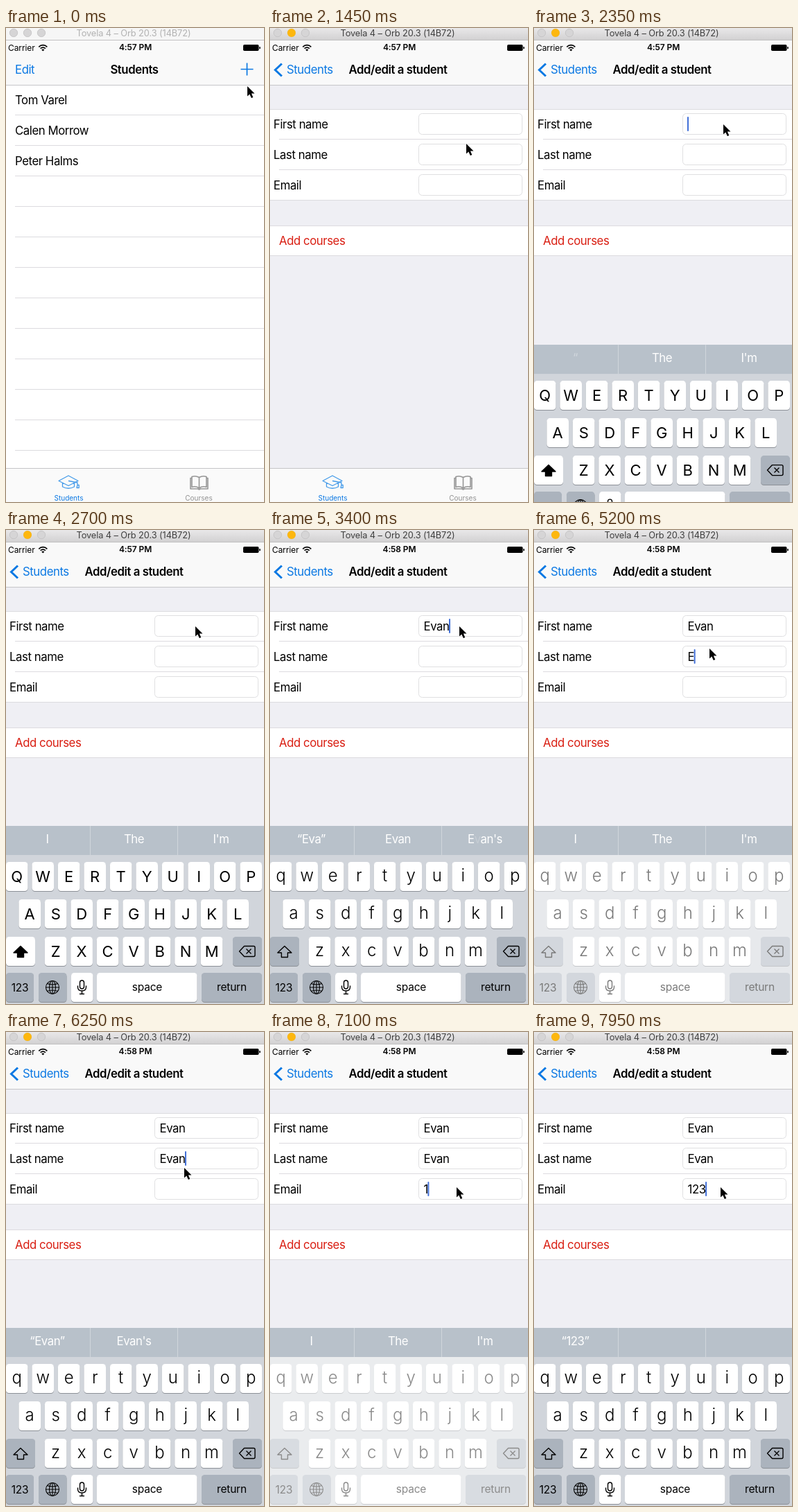
Animation of 372x684 px, one loop 8 s. Source, as an HTML page:

```html
<!DOCTYPE html>
<html lang="en">
<head>
<meta charset="utf-8">
<title>Add a student</title>
<style>
  html, body { margin: 0; width: 100%; height: 100%; overflow: hidden; background: #fff; }
  svg { display: block; width: 372px; height: 684px; }
  text { font: 400 16.8px Inter, Roboto, sans-serif; letter-spacing: -.45px; }
  .mid { text-anchor: middle; }
  .bold { font-weight: 600; }
  .blue { fill: #0b78e3; }
  .small { font-size: 12px; letter-spacing: -.1px; }
  .tab { font-size: 10px; letter-spacing: 0; }
  .word { fill: #fff; }
  .upper { font-size: 22px; letter-spacing: 0; }
  .lower { font-size: 24px; font-weight: 300; letter-spacing: 0; }
  .label { font-size: 15.5px; letter-spacing: -.2px; }
  .line { fill: none; stroke: #000; stroke-width: 1.4; stroke-linejoin: round; }
</style>
</head>
<body>
<svg id="stage" viewBox="0 0 372 684"></svg>
<script>
const LOOP = 8000;
const PUSH = 400, FOCUS_WINDOW = 350, KEYBOARD = 2185, MINUTE = 2900;

const fields = [
  { y: 123, focus: 2150, text: 'Evan', keys: [2750, 2950, 3150, 3350] },
  { y: 167, focus: 4400, text: 'Evan', keys: [5180, 5400, 5620, 5850] },
  { y: 211, focus: 6500, text: '123', keys: [7100, 7350, 7600] }
];

const suggestions = [
  [2200, '', 'The', "I'm"],
  [2300, '“', 'The', "I'm"],
  [2400, 'I', 'The', "I'm"],
  [3050, '“Ev”', 'Even', 'Every'],
  [3250, '“Eva”', 'Evan', 'E<tspan fill-opacity=".2">v</tspan>an\'s'],
  [3550, '“Evan”', "Evan's", ''],
  [4450, 'I', 'The', "I'm"],
  [5500, '“Ev”', 'Even', 'Every'],
  [5720, '“Eva”', 'Evan', "Evan's"],
  [5980, '“Evan”', "Evan's", ''],
  [6550, 'I', 'The', "I'm"],
  [7250, '“1”', '', ''],
  [7500, '“12”', '', ''],
  [7750, '“123”', '', '']
];

// [time, x, y] of the pointer tip
const pointerPath = [
  [0, 348, 84], [300, 347, 58], [850, 347, 58], [1450, 283, 167], [1650, 283, 167],
  [2000, 273, 139], [3750, 273, 139], [4250, 253, 171], [6000, 253, 171],
  [6250, 257, 196], [6450, 269, 224], [LOOP, 269, 224]
];

const text = (x, y, s, cls = '', attrs = '') => `<text x="${x}" y="${y}" class="${cls}" ${attrs}>${s}</text>`;
const rect = (x, y, w, h, fill, attrs = '') => `<rect x="${x}" y="${y}" width="${w}" height="${h}" fill="${fill}" ${attrs}/>`;
const path = (d, attrs = '') => `<path d="${d}" ${attrs}/>`;
const group = (id, body) => `<g id="${id}">${body}</g>`;
const rule = (x, y, color = '#dcdbdf') => rect(x, y, 372 - x, 1, color);

function listView() {
  const names = ['Tom Varel', 'Calen Morrow', 'Peter Halms'];
  const rules = Array.from({ length: 12 }, (_, i) => rule(13, 125 + 44 * i)).join('');
  return rect(0, 82, 372, 554, '#fff') + rules +
    names.map((name, i) => text(13, 110 + 44 * i, name)).join('');
}

function formView() {
  const labels = ['First name', 'Last name', 'Email'];
  return rect(0, 82, 372, 554, '#efeff4') +
    rect(0, 118, 372, 130, '#fff') + rect(0, 286, 372, 42, '#fff') +
    [117, 248, 285, 328].map(y => rule(0, y)).join('') + rule(13, 160) + rule(13, 204) +
    fields.map((f, i) => text(5, f.y + 22, labels[i]) +
      rect(214.5, f.y + .5, 149, 30, '#fff', 'rx="5" stroke="#dfdfe1"') +
      text(221.5, f.y + 22, '', '', `id="field${i}"`)).join('') +
    rect(0, 0, 2, 21, '#4270d8', 'id="caret" rx="1"') +
    text(13, 313, 'Add courses', '', 'fill="#d91e12"');
}

function navBar() {
  return rect(0, 17, 372, 65, '#f9f9f9') + rule(0, 82, '#c6c6c9') +
    group('listButtons', text(13, 66, 'Edit', 'blue') +
      path('M338.5 59.5h18M347.5 50.5v18', 'stroke="#0b78e3" stroke-width="1.7"')) +
    text(185, 66, 'Students', 'mid bold', 'id="listTitle"') +
    path('M17 51.5L7.5 60.5 17 69.5', 'id="chevron" fill="none" stroke="#0b78e3" stroke-width="3"') +
    text(24, 66, 'Students', 'blue', 'id="back"') +
    text(184.5, 66, 'Add/edit a student', 'mid bold', 'id="formTitle"') +
    text(3, 32.5, 'Carrier', 'small') +
    path('M47.3 27.3a8.2 8.2 0 0 1 12 0M49.7 29.7a5 5 0 0 1 7.2 0', 'fill="none" stroke="#000" stroke-width="1.7"') +
    path('M51.2 31.3q2.1-1.7 4.2 0l-2.1 2.2z') +
    text(186.5, 32, '', 'mid small bold', 'id="clock"') +
    rect(342, 24, 22.5, 9, '#000', 'rx="1.8"') + rect(365.2, 27, 1.6, 3.2, '#000', 'rx=".8"');
}

function tabBar() {
  return rect(0, 635, 372, 49, '#fafafa') + rule(0, 635, '#c4c4c7') +
    `<g fill="none" stroke="#459be9" stroke-width="1.3" stroke-linejoin="round">` +
    path('M76 653.5L90 646l14 7.5-14 7zM81.5 656.5v5.5q8.5 4.5 17 0v-5.5M90 653.5l13 2.5v4M102 663.5l1-4 2.2 0v4z') + '</g>' +
    `<g fill="none" stroke="#969696" stroke-width="1.6" stroke-linejoin="round">` +
    path('M278.5 648.5v15.5q-5-3.5-10.5-1.5v-15q5.500-2 10.500 1zq5-3 10.500-1v15q-5.500-2-10.500 1.500M268 649.500h-2v15.500h10.500l2 1 2-1h10.500v-15.500h-2') + '</g>' +
    text(90.5, 681.5, 'Students', 'tab mid blue') + text(278, 681.5, 'Courses', 'tab mid', 'fill="#929292"');
}

function key(x, y, w, fill = '#fff', attrs = '') {
  return rect(x, y + 1, w, 42, '#8c9097', 'rx="4.5"') + rect(x, y, w, 42, fill, `rx="4.5" ${attrs}`);
}

function letterRow(letters, firstCenter, y) {
  return [...letters].map((c, i) => {
    const x = firstCenter + 37.5 * i;
    return key(x - 15.8, y, 31.6) + text(x, y + 29, c.toUpperCase(), 'mid upper') + text(x, y + 28, c, 'mid lower');
  }).join('');
}

function keyboard() {
  const gray = '#abb3bd';
  return rect(0, 427, 372, 257, '#d1d5db') + rect(0, 427, 372, 42, '#b8c1ca') +
    [121, 247].map(x => rect(x, 427, 1, 42, '#d0d6dc')).join('') +
    [59.5, 184.5, 310].map(x => text(x, 452, '', 'mid word')).join('') +
    letterRow('qwertyuiop', 15.7, 479) + letterRow('asdfghjkl', 34.2, 533) + letterRow('zxcvbnm', 71.6, 587) +
    key(0, 587, 42, gray, 'id="shiftKey"') + path('M21 600.500l10 9.500h-5.500v6.500h-9v-6.500H11z', 'id="shift" class="line"') +
    key(327, 587, 42, gray) +
    path('M336.500 608l7-7.500h13.500q2 0 2 2v11q0 2-2 2h-13.500zM346.500 604.500l7 7m0-7l-7 7', 'class="line"') +
    key(0, 639, 40, gray) + text(20, 666, '123', 'mid label') +
    key(47, 639, 40.5, gray) +
    `<g class="line" style="stroke-width:1.1"><circle cx="67" cy="660" r="9.500"/><ellipse cx="67" cy="660" rx="4.500" ry="9.500"/>` +
    path('M57.500 660h19M67 650.500v19M59.500 654.500q7.500 3 15 0M59.500 665.500q7.500-3 15 0') + '</g>' +
    key(94, 639, 31.5) + rect(106.5, 650, 6, 12, 'none', 'rx="3" class="line"') +
    path('M103.500 657.500v2q0 5.500 6 5.500t6-5.500v-2M109.500 665v4.500m-3.500 0h7', 'class="line"') +
    key(131, 639, 144.5) + text(203.5, 665, 'space', 'mid label') +
    key(282, 639, 87, gray) + text(325.5, 665, 'return', 'mid label') +
    rect(0, 469, 372, 215, '#fff', 'id="flash"');
}

function windowBar() {
  return `<linearGradient id="chrome" x2="0" y2="1"><stop stop-color="#e9e8e9"/><stop offset="1" stop-color="#d2d1d2"/></linearGradient>` +
    rect(0, 0, 372, 17, '#f6f6f6', 'id="bar"') + rect(0, 17, 372, 1, '#c2c1c2') +
    [11, 31, 51].map(x => `<circle cx="${x}" cy="7" r="5.700" fill="#d6d5d6" stroke="#c2c1c2" stroke-width=".8"/>`).join('') +
    '<circle id="minimize" cx="31" cy="7" r="6" fill="#fdb70e"/>' +
    text(184, 12, 'Tovela 4 – Orb 20.3 (14B72)', 'mid', 'id="windowTitle" style="font-size:12.800px;letter-spacing:-.1px"');
}

const stage = document.getElementById('stage');
stage.innerHTML = group('list', listView()) + group('form', formView()) + navBar() + tabBar() +
  group('keyboard', keyboard()) + windowBar() +
  path('M0 0V14.500L3.300 11.500 5.800 17 8.300 15.900 5.900 10.500H10.500Z', 'id="pointer" stroke="#fff" stroke-width="1.200" paint-order="stroke"');

const el = id => document.getElementById(id);
const words = stage.querySelectorAll('.word');
const uppers = stage.querySelectorAll('.upper'), lowers = stage.querySelectorAll('.lower');
const clamp = v => Math.max(0, Math.min(1, v));
const easeOut = (v, power) => 1 - (1 - clamp(v)) ** power;
const move = (id, x, y = 0) => el(id).setAttribute('transform', `translate(${x} ${y})`);
const fade = (id, v) => el(id).setAttribute('opacity', v);
const show = (nodes, on) => nodes.forEach(n => n.setAttribute('visibility', on ? 'visible' : 'hidden'));

function drawWindow(t) {
  const active = t >= FOCUS_WINDOW;
  el('bar').setAttribute('fill', active ? 'url(#chrome)' : '#f6f6f6');
  el('windowTitle').setAttribute('fill', active ? '#3f3f3f' : '#b2b2b2');
  fade('minimize', active ? 1 : 0);
  el('clock').textContent = t < MINUTE ? '4:57 PM' : '4:58 PM';
}

function drawPush(t) {
  const p = easeOut((t - PUSH) / 450, 3);
  move('list', -112 * p);
  move('form', 372 * (1 - p));
  move('listTitle', -127 * p);
  move('back', 127 * (1 - p));
  move('formTitle', 190 * (1 - p));
  fade('listButtons', clamp(1 - 2 * p));
  fade('listTitle', clamp(1 - 1.5 * p));
  ['chevron', 'back', 'formTitle'].forEach(id => fade(id, p));
}

function drawFields(t) {
  let current = null;
  fields.forEach((f, i) => {
    el('field' + i).textContent = f.text.slice(0, f.keys.filter(k => k <= t).length);
    if (t >= f.focus) current = i;
  });
  if (current === null) return fade('caret', 0);
  const { y, focus, keys } = fields[current];
  const idle = t - Math.max(focus, ...keys.filter(k => k <= t));
  const label = el('field' + current);
  move('caret', 221 + (label.textContent ? label.getComputedTextLength() : 0), y + 5);
  fade('caret', idle % 1000 < 550 ? 1 : 0);
}

function drawKeyboard(t) {
  move('keyboard', 0, 257 * (1 - easeOut((t - KEYBOARD) / 400, 4)));
  let upper = true, switched = -LOOP;
  fields.forEach((f, i) => {
    if (i && t >= f.focus) { upper = true; switched = f.focus; }
    if (t >= f.keys[0]) { upper = false; switched = f.keys[0]; }
  });
  show(uppers, upper);
  show(lowers, !upper);
  el('shiftKey').setAttribute('fill', upper ? '#fff' : '#abb3bd');
  el('shift').style.fill = upper ? '#000' : 'none';
  fade('flash', .55 * clamp(1 - (t - switched) / 150));

  words.forEach((node, i) => {
    let word = '', since = 0;
    for (const [at, ...row] of suggestions)
      if (at <= t && row[i] !== word) { word = row[i]; since = at; }
    node.innerHTML = word;
    node.setAttribute('opacity', clamp((t - since) / 150));
  });
}

function drawPointer(t) {
  const n = pointerPath.findIndex(p => p[0] > t);
  const [t0, x0, y0] = pointerPath[n - 1], [t1, x1, y1] = pointerPath[n];
  const p = (t - t0) / (t1 - t0), s = p * p * (3 - 2 * p);
  move('pointer', x0 + (x1 - x0) * s, y0 + (y1 - y0) * s);
}

const start = performance.now();
function frame(now) {
  const t = Math.max(0, now - start) % LOOP;
  drawWindow(t);
  drawPush(t);
  drawFields(t);
  drawKeyboard(t);
  drawPointer(t);
  requestAnimationFrame(frame);
}
frame(start);
</script>
</body>
</html>
```
